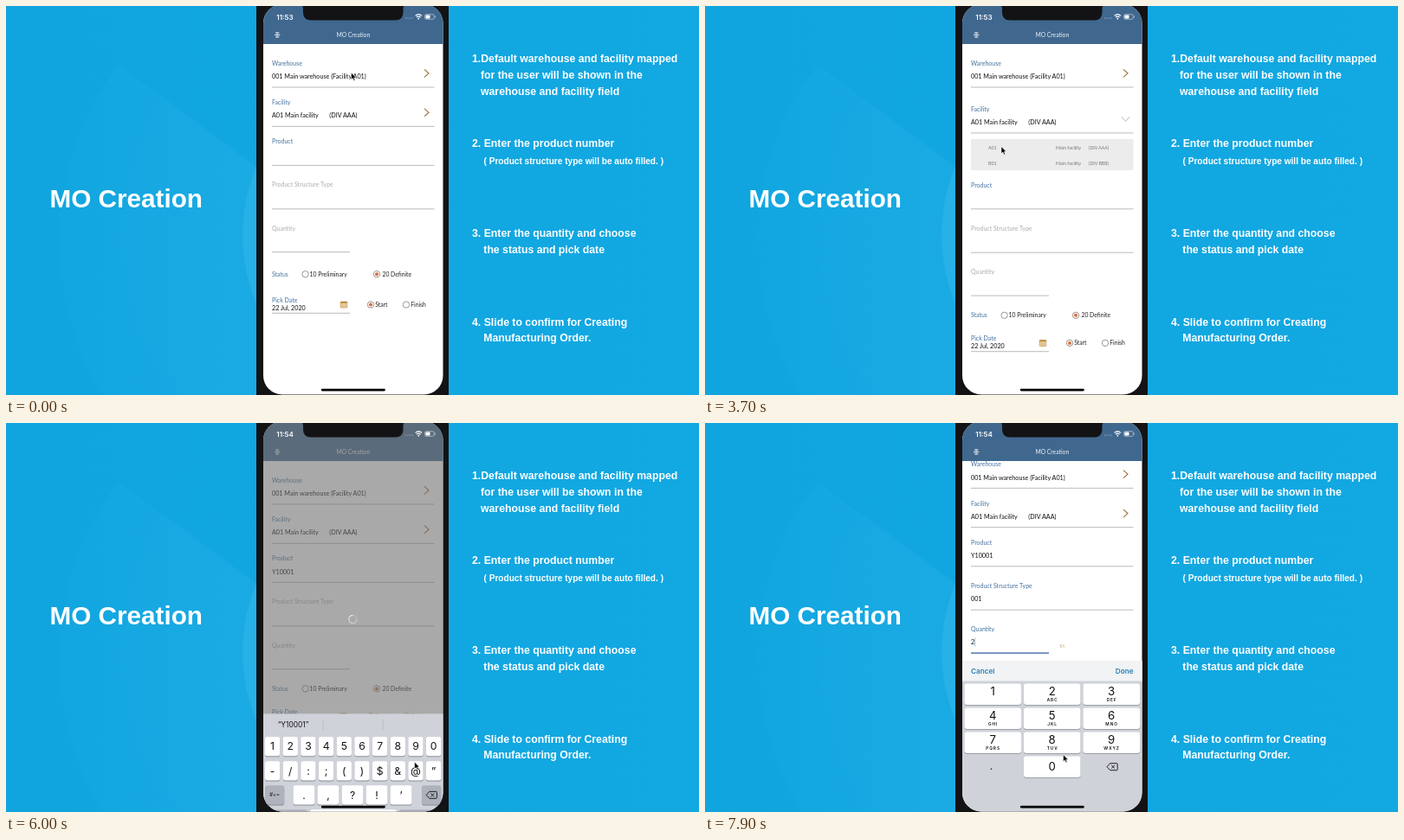
An HTML page that plays this animation: 800 px wide and 450 px high, repeating every 8 s.

```html
<!DOCTYPE html>
<html lang="en">
<head>
<meta charset="utf-8">
<title>MO Creation</title>
<style>
html, body { margin: 0; width: 100%; height: 100%; overflow: hidden; background: #10a6e0; }
svg { display: block; width: 800px; height: 450px; }
.big { font-family: "Liberation Sans", Arial, sans-serif; font-weight: 700; fill: #fff; }
.form { font-family: Lato, sans-serif; font-weight: 400; }
.ui { font-family: Inter, sans-serif; }
.mid { text-anchor: middle; }
</style>
</head>
<body>
<svg id="stage" viewBox="0 0 800 450"></svg>
<script>
const LOOP = 8000;
const BLUE = '#44719f', GREY = '#acacac', INK = '#111', KEY = '#fff', DARK = '#adb2bc';

const text = (x, y, size, str, cls, fill = INK, extra = '') =>
  `<text x="${x}" y="${y}" font-size="${size}" class="${cls}" fill="${fill}" ${extra}>${str}</text>`;
const rect = (x, y, w, h, fill, r = 0, extra = '') =>
  `<rect x="${x}" y="${y}" width="${w}" height="${h}" rx="${r}" fill="${fill}" ${extra}/>`;
const stroke = (d, color, w = 1, extra = '') =>
  `<path d="${d}" fill="none" stroke="${color}" stroke-width="${w}" ${extra}/>`;
const group = (id, body, extra = '') => `<g id="${id}" ${extra}>${body}</g>`;
const big = (x, y, str, size = 12.28) => text(x, y, size, str, 'big', '#fff');
const label = (y, str, fill = BLUE, id = '') => text(307, y, 7, str, 'form', fill, id && `id="${id}"`);
const value = (x, y, str, id = '') => text(x, y, 7.2, str, 'form', INK, id && `id="${id}"`);
const rule = (y, x2 = 494.5, id = '') => stroke(`M307 ${y}H${x2}`, '#b4b4b4', 0.9, id && `id="${id}"`);
const chevron = (y, id) => stroke(`M483 ${y - 4.5}L488 ${y}L483 ${y + 4.5}`, '#9f6c33', 1.1, `id="${id}"`);

function radio(x, y, str, on) {
  const dot = on ? `<circle cx="${x}" cy="${y}" r="2" fill="#d2703f"/>` : '';
  return `<circle cx="${x}" cy="${y}" r="3.7" fill="none" stroke="${on ? '#93766a' : '#7d7d7d'}" stroke-width=".8"/>` +
    dot + text(x + (x < 421 ? 5 : x > 427 && x < 430 ? 6.5 : 5.2), y + 2.4, 6.8, str, 'form', '#222');
}

function calendar(x, y) {
  return rect(x, y, 7.6, 7, '#efdcb8', 0.6, 'stroke="#c08f45" stroke-width=".7"') +
    rect(x, y, 7.6, 2, '#c08f45') +
    stroke(`M${x} ${y + 3.7}h7.6M${x} ${y + 5.4}h7.6M${x + 2.5} ${y + 2}v5M${x + 5} ${y + 2}v5`, '#d0a868', 0.5);
}

function form() {
  const row = (y, code, div) => text(327, y, 5.3, code, 'form', '#777') +
    text(405, y, 5.4, 'Main facility', 'form', '#777') + text(443, y, 5.2, div, 'form', '#777');
  const warehouse = label(68.8, 'Warehouse') + value(307, 84.2, '001 Main warehouse (Facility A01)') +
    rule(94) + chevron(77.8, 'chevA');
  const facility = label(114.2, 'Facility') + value(307, 129.4, 'A01 Main facility') +
    value(373.3, 129.4, '(DIV AAA)') + rule(139.3) + chevron(123.2, 'chevB');
  const list = rect(307, 154, 187.5, 36, '#ececec') + row(166, 'A01', '(DIV AAA)') + row(183.7, 'B01', '(DIV BBB)');
  const status = text(307, 309.9, 6.9, 'Status', 'form', BLUE, 'font-weight="700"') +
    radio(345.6, 307.4, '10 Preliminary') + radio(428, 307.4, '20 Definite', true);
  const date = label(336.6, 'Pick Date') + value(307, 345.6, '22 Jul, 2020') + rule(349.3, 397) +
    calendar(386.2, 336) + radio(421, 339.5, 'Start', true) + radio(462, 339.5, 'Finish');
  const rest = label(159.2, 'Product') + value(307, 174.5, '', 'product') + rule(184.4, 494.5, 'lineP') +
    label(209.4, 'Product Structure Type', GREY, 'labelS') + value(307, 224.6, '', 'struct') + rule(234.8) +
    label(259.5, 'Quantity', GREY, 'labelQ') + value(307, 275, '', 'qty') + rule(284.7, 397, 'lineQ') +
    text(409.5, 278.3, 4.8, 'EA', 'form', '#c3ad84', 'id="unit"') +
    rect(307, 167, 0.9, 10, '#3565a5', 0, 'id="caretP"') + rect(307, 267, 0.9, 10, '#3565a5', 0, 'id="caretQ"') +
    group('status', status) + group('date', date);
  return warehouse + group('fac', facility) + group('list', list, 'clip-path="url(#listClip)"') + group('rest', rest);
}

function key(cx, cy, w, str, fill = KEY, size = 12.2, h = 22.4) {
  return rect(cx - w / 2, cy - h / 2 + 0.9, w, h, '#8b8e95', 2.8) + rect(cx - w / 2, cy - h / 2, w, h, fill, 2.8) +
    text(cx, cy + size * 0.35, size, str, 'ui mid');
}
const keyRow = (chars, x, y) => chars.map((c, i) => key(x + i * 20.67, y, 17.3, c)).join('');
const backspace = (x, y) => stroke(`M${x - 6} ${y}l3.6-4h7.6q1 0 1 1v6q0 1-1 1h-7.6zM${x - 0.8} ${y - 1.9}l3.8 3.8m0-3.8l-3.8 3.8`, INK, 0.9);

function keyboard() {
  const letters = keyRow([...'qwertyuiop'], 307.6, 313.8) + keyRow([...'asdfghjkl'], 318, 342) +
    keyRow([...'zxcvbnm'], 338.6, 370) + key(310.2, 370, 22, '', DARK) +
    stroke('M310.2 365l5 5h-2.7v4.3h-4.6V370h-2.7z', INK, 0.9) + key(323.5, 398.2, 49, '123', DARK, 8.2);
  const marks = keyRow([...'1234567890'], 307.6, 313.8) +
    keyRow(['-', '/', ':', ';', '(', ')', '$', '&amp;', '@', '”'], 307.6, 342) +
    ['.', ',', '?', '!', '’'].map((c, i) => key(344 + i * 28, 370, 25, c)).join('') +
    key(310.2, 370, 22, '#+=', DARK, 6) + key(323.5, 398.2, 49, 'ABC', DARK, 8.2);
  const face = '<circle cx="317.5" cy="428.8" r="6.6" fill="none" stroke="#555a62" stroke-width="1"/>' +
    '<circle cx="315.2" cy="427" r=".9" fill="#555a62"/><circle cx="319.8" cy="427" r=".9" fill="#555a62"/>' +
    stroke('M313.4 430q4.1 5.6 8.2 0z', '#555a62', 0.9);
  const mic = rect(481.9, 421.3, 4.4, 9, 'none', 2.2, 'stroke="#555a62" stroke-width=".9"') +
    stroke('M479.6 427v1.2q0 4.4 4.5 4.4t4.5-4.4V427M484.1 432.6v2.8M481.6 435.6h5', '#555a62', 0.9);
  return rect(297, 276, 208, 176, '#cfd2d9') + stroke('M366 282.5v13M435 282.5v13', '#b4b8c0', 0.7) +
    [331.5, 401, 470].map((x, i) => text(x, 292, 8.4, '', 'ui mid', INK, `id="hint${i}"`)).join('') +
    group('letters', letters) + group('marks', marks) +
    key(491.2, 370, 22, '', DARK) + backspace(491.2, 370) +
    key(401, 398.2, 100, 'space', KEY, 8.2) + key(478.3, 398.2, 49, 'return', DARK, 8.2) + face + mic;
}

function keypad() {
  const names = ['', 'ABC', 'DEF', 'GHI', 'JKL', 'MNO', 'PQRS', 'TUV', 'WXYZ'];
  const cap = (x, y) => rect(x - 32.8, y - 11.4, 65.6, 24.5, '#8b8e95', 2.8) + rect(x - 32.8, y - 12.2, 65.6, 24.4, KEY, 2.8);
  const digits = names.map((n, i) => {
    const x = 332.2 + i % 3 * 68.5, y = 313.7 + Math.floor(i / 3) * 28;
    return cap(x, y) + text(x, y + 1.4, 13.2, i + 1, 'ui mid') +
      text(x + 0.4, y + 8.3, 4.8, n, 'ui mid', INK, 'font-weight="600" letter-spacing=".9"');
  }).join('');
  const blue = 'font-weight="600"';
  return rect(297, 275, 208, 177, '#cfd2d9') + rect(297, 275, 208, 23.5, '#f2f3f4') +
    text(307, 290.4, 8.2, 'Cancel', 'ui', '#2a7db8', blue) +
    text(494.5, 290.4, 8.2, 'Done', 'ui', '#2a7db8', blue + ' text-anchor="end"') +
    digits + cap(400.7, 397.7) + text(400.7, 402.2, 13.2, '0', 'ui mid') +
    text(330.5, 401, 12, '.', 'ui mid') + backspace(470, 397.7);
}

function statusBar() {
  return text(312.3, 15.6, 8, '', 'ui', '#fff', 'id="clock" font-weight="600"') +
    [461.5, 464, 466.5, 469].map(x => `<circle cx="${x}" cy="14" r=".6" fill="#b8c9da"/>`).join('') +
    stroke('M472.6 11.4q3.7-3.4 7.4 0M474 13.1q2.3-2.1 4.6 0', '#fff', 1.2) +
    '<circle cx="476.3" cy="14.7" r=".9" fill="#fff"/>' +
    rect(483.6, 9.7, 10.6, 5.6, 'none', 1.5, 'stroke="#c3d0de" stroke-width=".7"') +
    rect(484.5, 10.6, 5, 3.8, '#fff', 0.7) + rect(494.9, 11.5, 0.8, 2, '#c3d0de');
}

function spinner() {
  let s = '';
  for (let i = 0; i < 10; i++) {
    s += stroke('M0-4.6A4.6 4.6 0 0 1 2.7-3.72', '#f2f2f2', 1.2, `opacity="${0.15 + i * 0.08}" transform="rotate(${i * 36})"`);
  }
  return s;
}

function build() {
  const header = rect(297, -2, 208, 46, '#40688f') + text(400.8, 36, 6.75, 'MO Creation', 'form mid', '#eef2f6', 'font-weight="700"') +
    stroke('M311 31h4.4M310 33.4h6.4M311 35.8h4.4', '#f0f4f8', 1) + stroke('M313.2 30v7', '#f0f4f8', 0.6);
  document.getElementById('stage').innerHTML = `
    <defs>
      <linearGradient id="sky" x2="1" y2="0"><stop offset="0" stop-color="#10a5df"/><stop offset="1" stop-color="#12a8e2"/></linearGradient>
      <linearGradient id="fan" x2="1" y2="0"><stop offset="0" stop-color="#2bb2e8" stop-opacity=".08"/><stop offset="1" stop-color="#2bb2e8" stop-opacity=".4"/></linearGradient>
      <clipPath id="screen"><rect x="297" y="-2" width="207.5" height="451.5" rx="22"/></clipPath>
      <clipPath id="body"><rect x="297" y="44" width="208" height="406"/></clipPath>
      <clipPath id="listClip"><rect id="listRect" x="307" y="154" width="188" height="36"/></clipPath>
    </defs>` +
    rect(0, 0, 800, 450, 'url(#sky)') +
    '<path d="M400 270L130 68A337 337 0 0 0 112 450H400z" fill="url(#fan)"/>' +
    '<path d="M400 270L185 105A271 271 0 0 0 200 450H400z" fill="url(#fan)" opacity=".5"/>' +
    '<path d="M400 73.5A208 208 0 0 0 400 456.5z" fill="#2bb3e9" opacity=".75"/>' +
    big(50.5, 233.4, 'MO Creation', 29.7) +
    big(538, 65.2, '1.Default warehouse and facility mapped') +
    big(548, 83.9, 'for the user will be shown in the') +
    big(548, 102.6, 'warehouse and facility field') +
    big(538, 163, '2. Enter the product number') +
    big(551.5, 182.6, '( Product structure type will be auto filled. )', 10.1) +
    big(538, 267, '3. Enter the quantity and choose') +
    big(551.3, 285.8, 'the status and pick date') +
    big(538, 369.8, '4. Slide to confirm for Creating') +
    big(551.3, 388.4, 'Manufacturing Order.') +
    rect(289, 0, 222, 450, '#131315') +
    `<g clip-path="url(#screen)">` + rect(297, -2, 208, 454, '#fff') +
    `<g clip-path="url(#body)">` + group('form', form()) + '</g>' + header +
    group('veil', rect(297, -2, 208, 454, '#6e6e6e', 0, 'opacity=".59"') + group('spin', spinner())) +
    statusBar() + group('kb', keyboard()) + group('pad', keypad()) + '</g>' +
    '<path d="M339-1q4 0 4 4v4.5q0 9 9 9h97.5q9 0 9-9V3q0-4 4-4z" fill="#131315"/>' +
    rect(363.8, 442.8, 74, 2.6, '#000', 1.3) +
    group('pointer', '<path d="M0 0V8.2L1.9 6.5L3.2 9.4L4.6 8.8L3.4 6H5.8z" fill="#000" stroke="#fff" stroke-width=".6"/>');
}

// pointer stops: time, x, y
const path = [
  [0, 398.5, 77], [300, 398.5, 77], [700, 484, 76], [1000, 484, 76], [1350, 484, 121], [1750, 484, 126],
  [2350, 349, 179.5], [2900, 349, 179.5], [3700, 342, 162.5], [3900, 342, 162.5], [4400, 341, 170], [4550, 341, 170],
  [4880, 409, 311], [4980, 409, 311], [5180, 332.5, 392.5], [5300, 332.5, 392.5], [5400, 307, 314], [5430, 307, 314],
  [5500, 492, 313], [5630, 492, 313], [5710, 307, 314], [5740, 307, 314], [5850, 471.5, 392], [6200, 471.5, 392],
  [6700, 336.5, 273.5], [7120, 336.5, 273.5], [7500, 400, 312], [7790, 400, 312], [7890, 413.5, 383.5], [8000, 413.5, 383.5]
];
const typed = [[4990, 'Y'], [5420, 'Y1'], [5500, 'Y10'], [5560, 'Y100'], [5620, 'Y1000'], [5730, 'Y10001']];

const ramp = (t, a, b) => {
  const x = Math.min(1, Math.max(0, (t - a) / (b - a)));
  return x * x * (3 - 2 * x);
};
const $ = {};
const set = (id, name, v) => $[id].setAttribute(name, v);
const move = (id, x, y) => set(id, 'transform', `translate(${x} ${y})`);
const show = (id, on) => set(id, 'visibility', on ? 'visible' : 'hidden');
const write = (id, s) => { if ($[id].textContent !== s) $[id].textContent = s; };
const focus = (id, on) => {
  set(id, 'stroke', on ? '#2f5f9e' : '#b4b4b4');
  set(id, 'stroke-width', on ? 1.3 : 0.9);
};

function pointerAt(t) {
  const i = Math.max(1, path.findIndex(p => p[0] > t));
  const a = path[i - 1], b = path[i], k = ramp(t, a[0], b[0]);
  return [a[1] + (b[1] - a[1]) * k, a[2] + (b[2] - a[2]) * k];
}

function draw(t) {
  const open = ramp(t, 1430, 1720) - ramp(t, 3880, 4180);
  const settle = 1 - ramp(t, 1430, 1720);
  move('fac', 0, 7.6 * open);
  set('listRect', 'height', 36 * open);
  show('list', open > 0.01);
  move('rest', 0, 50.4 * open);
  move('status', 0, 2.8 * settle);
  move('date', 0, 6 * settle);
  set('chevB', 'transform', `rotate(${90 * open} 485.5 123.2)`);
  set('chevB', 'stroke', open > 0.5 ? '#c9c9c9' : '#9f6c33');
  write('clock', t < 4100 ? '11:53' : '11:54');

  // product entry
  const entry = typed.filter(e => e[0] <= t).pop();
  const product = entry ? entry[1] : '';
  const inP = t >= 4500 && t < 5850;
  write('product', product);
  focus('lineP', inP);
  show('caretP', inP);
  set('caretP', 'x', 307 + (product ? $.product.getComputedTextLength() + 0.2 : 0));
  const kb = ramp(t, 4520, 4800) - ramp(t, 5890, 6170);
  show('kb', kb > 0);
  move('kb', 0, 174 * (1 - kb));
  const digits = t >= 5290, only = product === 'Y';
  set('letters', 'display', digits ? 'none' : 'inline');
  set('marks', 'display', digits ? 'inline' : 'none');
  write('hint0', product ? `“${product}”` : '');
  write('hint1', only ? 'You' : '');
  write('hint2', only ? 'Yeah' : '');

  // loading
  const veil = ramp(t, 5830, 5960) - ramp(t, 6480, 6600);
  set('veil', 'opacity', veil);
  set('spin', 'transform', `translate(400.4 227) rotate(${t * 0.36})`);
  const loaded = t >= 6500;
  write('struct', loaded ? '001' : '');
  set('labelS', 'fill', loaded ? BLUE : GREY);
  show('unit', loaded);

  // quantity entry
  const inQ = t >= 6980, qty = t >= 7850 ? '2' : '';
  set('labelQ', 'fill', inQ ? BLUE : GREY);
  focus('lineQ', inQ);
  write('qty', qty);
  show('caretQ', inQ);
  set('caretQ', 'x', qty ? 311.2 : 307);
  set('caretQ', 'opacity', qty ? 0.45 : 1);
  const pad = ramp(t, 7150, 7450);
  show('pad', pad > 0);
  move('pad', 0, 176 * (1 - pad));
  move('form', 0, -18.6 * pad);

  const [x, y] = pointerAt(t);
  move('pointer', x, y);
}

build();
document.querySelectorAll('[id]').forEach(e => { $[e.id] = e; });
const start = performance.now();
function tick() {
  draw((performance.now() - start) % LOOP);
  requestAnimationFrame(tick);
}
tick();
</script>
</body>
</html>
```
